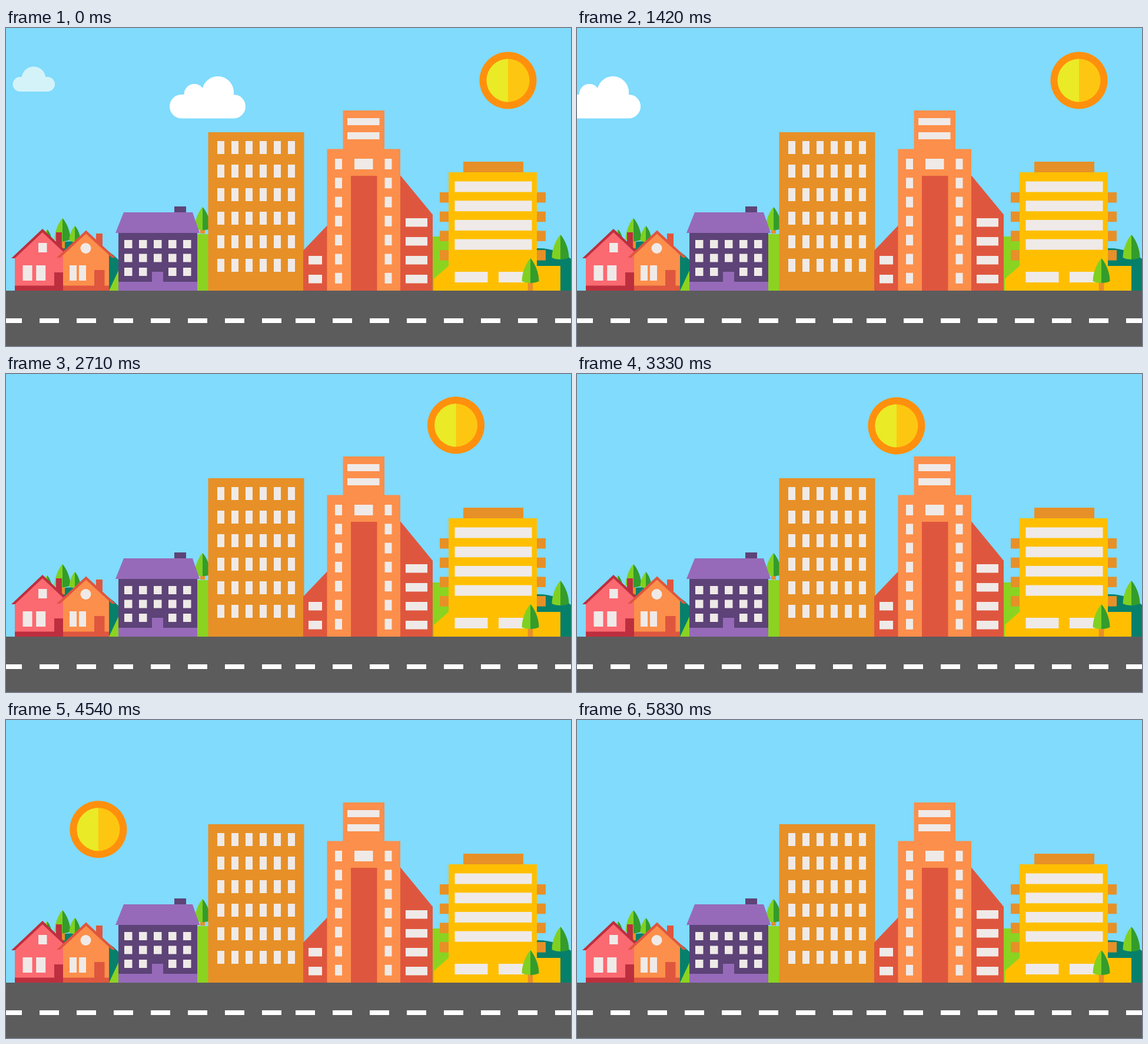
An HTML page that plays this animation: 960x540 px, repeating every 5870 ms.

```html
<!DOCTYPE html>
<html lang="en">
<head>
<meta charset="utf-8">
<title>City street</title>
<style>
  html, body { margin: 0; width: 100%; height: 100%; overflow: hidden; background: #80dbfd; }
  svg { display: block; width: 960px; height: 540px; }
</style>
</head>
<body>
<svg id="stage" viewBox="0 0 960 540"></svg>
<script>
const LOOP = 5870, FRAME = 1000 / 24, CLOUD_SPEED = -0.211, GROUND = 446;
const C = {
  sky: '#80dbfd', road: '#5d5c5d', glass: '#efeae8', lime: '#8bd321', teal: '#06806b',
  leaf: '#80d022', shade: '#339c2b', amber: '#e79027', orange: '#fc8f4b', red: '#df563e',
  pink: '#fb6971', crimson: '#bd2f3e', plum: '#5d4377', lilac: '#966ab9', yellow: '#ffbf00'
};
// Key points of the sun's arc: time, x, y
const SUN = [
  [2400, 853, 89], [2710, 764, 87], [3330, 544, 88], [3710, 436, 100],
  [4130, 304, 137], [4540, 157.5, 185.5], [5130, -60, 270]
];

const stage = document.getElementById('stage');
const rect = (x, y, w, h, fill, r = 0) =>
  `<rect x="${x}" y="${y}" width="${w}" height="${h}" fill="${fill}" rx="${r}"/>`;
const tower = (x, y, w, fill) => rect(x, y, w, GROUND - y, fill);
const poly = (points, fill) => `<polygon points="${points}" fill="${fill}"/>`;
const ellipse = (x, y, rx, ry, fill) =>
  `<ellipse cx="${x}" cy="${y}" rx="${rx}" ry="${ry}" fill="${fill}"/>`;
const circle = (x, y, r, fill) => ellipse(x, y, r, r, fill);
const path = (d, fill) => `<path d="${d}" fill="${fill}"/>`;

function grid(x, y, cols, rows, dx, dy, w, h, fill = C.glass) {
  let out = '';
  for (let r = 0; r < rows; r++)
    for (let c = 0; c < cols; c++) out += rect(x + c * dx, y + r * dy, w, h, fill);
  return out;
}

function tree(x, top, half, trunk = 0) {
  const height = half * 2.9, base = top + height;
  const side = s => `M${x} ${top}C${x + s * half * 0.55} ${top + height * 0.2} ` +
    `${x + s * half} ${top + height * 0.6} ${x + s * half} ${base - 3}` +
    `Q${x + s * half * 0.6} ${base} ${x} ${base}Z`;
  return rect(x - half * 0.3, base - 2, half * 0.6, trunk && trunk + 2, C.amber) +
    path(side(-1), C.leaf) + path(side(1), C.shade);
}

// Gabled house: wall, plinth and a sloping roof edge cut flat at the eaves
function house(x, top, half, eave, wall, fill, trim) {
  const band = 6;
  return poly([x - wall, eave - 5, x, top + 3, x + wall, eave - 5,
    x + wall, GROUND, x - wall, GROUND], fill) +
    tower(x - wall, GROUND - 8.5, wall * 2, trim) +
    poly([x - half, eave, x, top, x + half, eave,
      x + half - band, eave, x, top + band, x - half + band, eave], trim);
}

const sun = circle(0, 0, 48.5, '#ff900d') + circle(0, 0, 36.5, '#fdc711') +
  path('M0-36.5A36.5 36.5 0 0 0 0 36.5Z', '#eaea26');

const bigCloud = rect(278, 113, 129, 40.5, '#fff', 20.2) +
  circle(360, 109, 27, '#fff') + circle(320, 112.5, 17.5, '#fff');
const smallCloud = rect(11.5, 83, 71.5, 25, '#d4f3f9', 12.5) +
  circle(47, 86, 20.5, '#d4f3f9');

const greenery = ellipse(115, GROUND, 97, 84, C.teal) + ellipse(905, GROUND, 83, 72, C.teal) +
  poly('175,446 191,412 191,446', C.lime) + tower(325, 350, 19, C.lime) +
  tower(725, 354, 28, C.lime) +
  tree(70, 342, 8) + tree(96, 323, 13.5, 12) + tree(117, 336, 9.5, 8) +
  tree(334, 304, 13.5, 6) + tree(942, 351, 14.5);

const pinkHouse = rect(85, 347, 10, 28, C.crimson) +
  house(62, 341, 53, 391, 47, C.pink, C.crimson) +
  rect(82, 415, 15, 24, C.crimson) +
  rect(55, 365, 14.5, 16, C.glass) + grid(28.5, 403, 2, 1, 22.7, 0, 16, 26);

const orangeHouse = rect(153, 349, 11, 25, C.red) +
  house(136, 343.5, 50, 390, 39, C.orange, C.red) +
  rect(150, 411, 17.5, 27, C.red) + circle(135.5, 374, 9, C.glass) +
  grid(108, 403, 2, 1, 16, 0, 12, 26);

const purpleHouse = rect(286, 303, 20, 12, C.plum) + tower(191, 347, 134, C.plum) +
  poly('200,313 317,313 329,348 186,348', C.lilac) +
  grid(201, 360, 5, 3, 25, 23.5, 13.5, 14) + rect(248, 405, 19, 18, C.plum) +
  tower(191, 431, 134, C.lilac) + rect(248, 414, 19, 18, C.lilac);

const amberBlock = tower(343.5, 177, 163, C.amber) + grid(359, 192, 6, 6, 24, 40, 12, 22);

const redTower = poly('505,446 505,378 546,335 546,446', C.red) +
  poly('669,446 669,249 725,317 725,446', C.red) +
  tower(572.5, 140, 70.5, C.orange) + tower(545.5, 205.5, 124.5, C.orange) +
  tower(586, 251, 44.5, C.red) +
  grid(580, 153, 1, 2, 0, 24, 54.5, 12) + rect(592, 222, 31.5, 18, C.glass) +
  grid(559, 222, 2, 7, 84.5, 32.3, 12, 18) +
  grid(514, 387, 1, 2, 0, 32, 23, 14.5) + grid(679, 323, 1, 4, 0, 32, 37, 14.5);

const yellowBlock = poly('727,446 727,426 752,404 942,404 942,446', C.yellow) +
  tower(752, 245, 150, C.yellow) + rect(777, 227, 102, 18, C.amber) +
  grid(737, 279, 2, 4, 165, 32.7, 15, 17.5, C.amber) +
  grid(762.5, 260.5, 1, 4, 0, 32.7, 131, 18) +
  grid(762.5, 414, 2, 1, 74.5, 0, 56, 18) + tree(891, 391, 14.5, 14);

const road = tower(0, GROUND, 960, C.road) + rect(0, GROUND, 960, 94, C.road) +
  grid(-6, 493, 8, 1, 63, 0, 33, 8, '#fff') + grid(492, 493, 8, 1, 63, 0, 33, 8, '#fff');

stage.innerHTML = rect(0, 0, 960, 540, C.sky) +
  `<g id="sun">${sun}</g><g id="clouds">${smallCloud}${bigCloud}</g>` +
  greenery + pinkHouse + orangeHouse + purpleHouse + amberBlock + redTower + yellowBlock + road;

const sunNode = document.getElementById('sun');
const cloudNode = document.getElementById('clouds');

// Smooth curve through the key points, at rest at the start
function sunAt(t, axis) {
  const last = SUN.length - 1;
  if (t <= SUN[0][0]) return SUN[0][axis];
  if (t >= SUN[last][0]) return SUN[last][axis];
  const i = SUN.findIndex(p => p[0] > t) - 1;
  const slope = k => {
    if (k === 0) return 0;
    const a = SUN[k - 1], b = SUN[Math.min(k + 1, last)];
    return (b[axis] - a[axis]) / (b[0] - a[0]);
  };
  const [p, q] = [SUN[i], SUN[i + 1]];
  const d = q[0] - p[0], u = (t - p[0]) / d, v = 1 - u;
  return p[axis] * v * v * (1 + 2 * u) + q[axis] * u * u * (1 + 2 * v) +
    d * u * v * (slope(i) * v - slope(i + 1) * u);
}

function draw(now) {
  const t = Math.floor((now % LOOP + 5) / FRAME) * FRAME;
  cloudNode.setAttribute('transform', `translate(${CLOUD_SPEED * t} 0)`);
  sunNode.setAttribute('transform', `translate(${sunAt(t, 1)} ${sunAt(t, 2)})`);
}

const start = performance.now();
function tick() {
  draw(performance.now() - start);
  requestAnimationFrame(tick);
}
draw(0);
requestAnimationFrame(tick);
</script>
</body>
</html>
```
